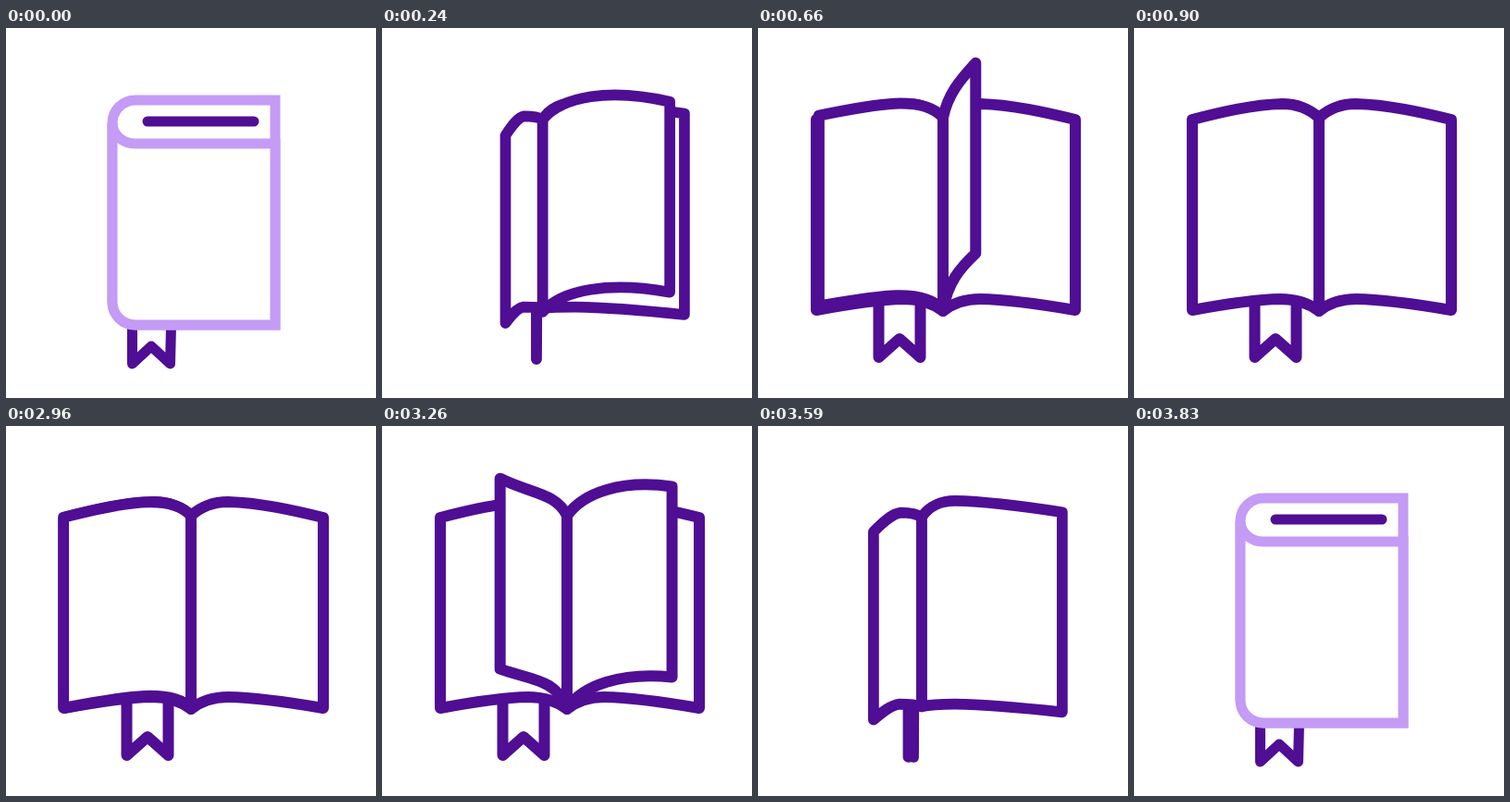
Animation, 400 px wide and 400 px high, one loop 4860 ms. Source, as an HTML page with a canvas:

```html
<!DOCTYPE html>
<html>
<head>
<meta charset="utf-8">
<style>
html, body { margin: 0; width: 100%; height: 100%; overflow: hidden; background: #fff; }
canvas { display: block; width: 100vmin; height: 100vmin; }
</style>
</head>
<body>
<canvas id="stage" width="400" height="400"></canvas>
<script>
const ctx = document.getElementById('stage').getContext('2d');
const LOOP = 4860, STEP = 30, TURN_BACK = 2960;
const DARK = [79, 14, 147], LIGHT = [196, 155, 245];

// Start and end of each page turn.
const FORWARD = [[200, 472], [290, 690], [490, 890]];
const BACKWARD = [[2955, 3341], [3136, 3522], [3270, 3570]];

const clamp = v => Math.max(0, Math.min(1, v));
const lerp = (a, b, k) => a + (b - a) * k;
const mix = (a, b, k) => a.map((v, i) => lerp(v, b[i], k));
const smooth = v => { v = clamp(v); return v * v * (3 - 2 * v); };
const rgb = c => `rgb(${c.map(Math.round).join()})`;

// 0 is open, 1 is closed.
function closedness(t) {
  return t < 1000 ? 1 - smooth((t - 10) / 365) : smooth((t - 3465) / 365);
}

function paint() {
  ctx.closePath();
  ctx.fill();
  ctx.stroke();
}

function polyline(...pts) {
  ctx.beginPath();
  pts.forEach(([x, y]) => ctx.lineTo(x, y));
  ctx.stroke();
}

// A cover edge bends from the spine over a knee, then runs to its corner.
function edgePoints(spine, knee, corner, e) {
  const from = (a, b, kx, ky) => [lerp(a[0], b[0], kx), lerp(a[1], b[1], ky)];
  return [
    spine,
    from(spine, knee, lerp(0.3, 0, e), lerp(0.73, 0.56, e)),
    from(spine, knee, lerp(0.65, 0.44, e), 1),
    knee,
    from(knee, corner, 0.34, 0.06),
    from(knee, corner, 0.68, 0.53),
    corner
  ];
}

function cover(top, bottom) {
  const b = [...bottom].reverse();
  ctx.beginPath();
  ctx.moveTo(...top[0]);
  ctx.bezierCurveTo(...top.slice(1, 4).flat());
  ctx.bezierCurveTo(...top.slice(4).flat());
  ctx.lineTo(...b[0]);
  ctx.bezierCurveTo(...b.slice(1, 4).flat());
  ctx.bezierCurveTo(...b.slice(4).flat());
  paint();
}

// A page swings from right (turn 0) to left (turn 1) and rises on the way.
function page(turn, [x, y], scale) {
  const c = Math.cos(Math.PI * turn);
  const s = Math.sin(Math.PI * Math.pow(turn, 0.9));
  const near = [x + 22 * c * scale, y - 25];
  const far = [x + 75 * c * scale, y - 14 - 22 * s - 18 * s * c];
  const corner = [x + (2.5 + 140.5 * c) * scale, y + 2 - 62 * Math.pow(s, 1.7)];
  const drop = 211 - 9 * s + 6 * s * c;
  ctx.beginPath();
  ctx.moveTo(x, y);
  ctx.bezierCurveTo(...near, ...far, ...corner);
  ctx.lineTo(corner[0], corner[1] + 206);
  ctx.bezierCurveTo(far[0], far[1] + drop, near[0], near[1] + drop, x, y + 208);
  paint();
}

// The ribbon turns edge-on once while the book closes.
function ribbon(e) {
  const flat = 0.31, after = clamp((e - flat) / (1 - flat));
  const half = e < flat ? 22.5 * (1 - e / flat) : 20.5 * Math.sin(after * Math.PI / 2);
  const mid = e < flat ? lerp(153, 167, e / flat) : lerp(167, 157, after);
  const top = lerp(295, 322, e), low = lerp(356, 363, e), notch = lerp(336, 344, e);
  polyline([mid - half, top], [mid - half, low], [mid, notch],
    [mid + half, low], [mid + half + e, top]);
}

function draw(t) {
  const e = closedness(t);
  const swing = 11 * Math.sin(Math.PI * e);
  const blend = (open, closed) => mix(open, closed, e);
  const edge = (spine, knee, corner) => edgePoints(spine, knee, corner, e);
  const lower = ([x, y]) => [x, y + swing];

  const head = blend([200, 97], [115, 103]), foot = blend([200, 306], [115, 296]);
  const backTop = edge(head, blend([240, 82], [140, 78]), blend([343, 99], [291, 78]));
  const backFoot = edge(foot, blend([240, 293], [140, 321]), blend([343, 305], [291, 321]));
  const frontTop = edge(head, blend([160, 82], [140, 125]), lower(blend([63, 99], [291, 125])));
  const frontFoot = edge(foot, blend([158, 293], [140, 321]), lower(blend([63, 305], [291, 321])));
  const right = backTop[6][0];

  ctx.fillStyle = '#fff';
  ctx.fillRect(0, 0, 400, 400);
  ctx.lineWidth = lerp(12, 11, e);
  ctx.lineCap = ctx.lineJoin = 'round';
  ctx.miterLimit = 2;
  ctx.strokeStyle = rgb(DARK);
  ribbon(e);

  const tint = rgb(mix(DARK, LIGHT, smooth((e - 0.45) / 0.4)));
  ctx.strokeStyle = tint;
  ctx.lineJoin = e > 0.95 ? 'miter' : 'round';
  cover(backTop, backFoot);

  const bar = clamp((e - 0.55) / 0.45), barX = head[0] + 38;
  if (bar > 0) {
    ctx.strokeStyle = rgb(DARK);
    polyline([barX, 101], [lerp(barX, right - 23, bar), 101]);
    ctx.strokeStyle = tint;
  }
  cover(frontTop, frontFoot);

  ctx.lineJoin = 'round';
  const back = t >= TURN_BACK;
  for (const [start, end] of back ? BACKWARD : FORWARD) {
    const k = (t - start) / (end - start);
    if (k > 0 && k < 1) page(back ? 1 - k : k, head, (right - head[0]) / 143);
  }
}

function frame(now) {
  const t = now % LOOP;
  const base = t < TURN_BACK ? 0 : TURN_BACK;
  draw(base + Math.floor((t - base) / STEP) * STEP);
  requestAnimationFrame(frame);
}

draw(0);
requestAnimationFrame(frame);
</script>
</body>
</html>
```
